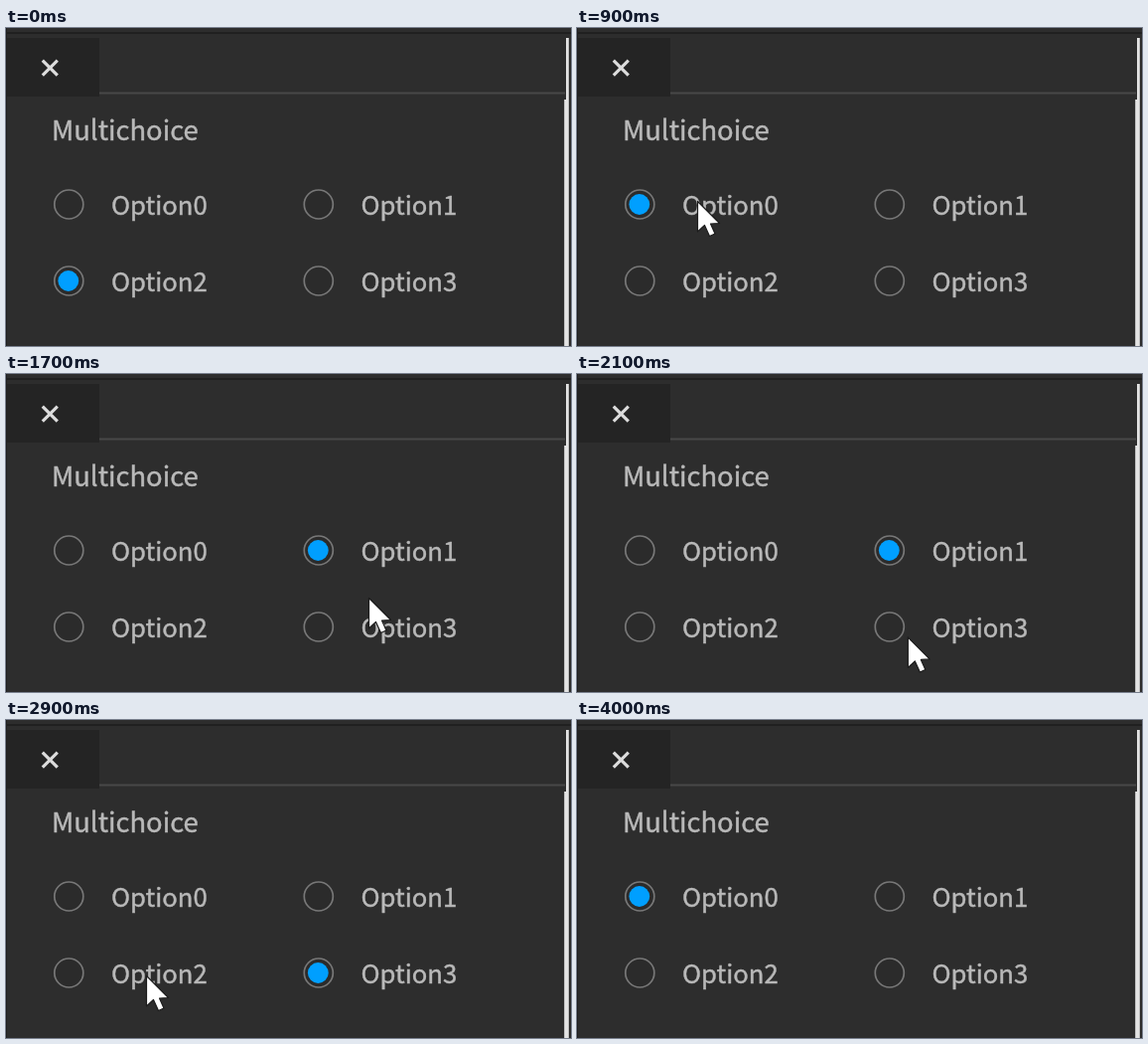
Animation, 569 px wide and 320 px high, one loop 4.6 s. Source, as an HTML page:

```html
<!DOCTYPE html>
<html lang="en">
<head>
<meta charset="utf-8">
<title>Multichoice</title>
<style>
  html, body { margin: 0; width: 100%; height: 100%; overflow: hidden; background: #2d2d2d; }
  svg { display: block; width: 569px; height: 320px; }
  text {
    font: 25.7px "Noto Sans CJK JP", "Noto Sans CJK SC", "Noto Sans CJK", "Noto Sans", sans-serif;
    fill: #b9b9b9; stroke: #b9b9b9; stroke-width: 0.45;
  }
  .title { font-size: 27.4px; }
  .soft { filter: blur(0.6px); }
  .ring { fill: #2b2b2b; stroke: #787878; stroke-width: 1.7; }
  .dot { fill: #009fff; }
</style>
</head>
<body>
<svg viewBox="0 0 569 320">
  <rect width="569" height="320" fill="#2d2d2d"/>
  <rect y="4" width="569" height="2" fill="#202020"/>
  <rect y="10" width="94" height="59" fill="#242424"/>
  <rect width="1" height="320" fill="#1f1f1f"/>
  <rect x="94" y="64.5" width="469" height="2" fill="#484848"/>
  <g class="soft">
    <path d="M564 10h2.8v320h-4.6V72h1.8z" fill="#e4e4e4"/>
    <path d="M36.8 32.7l15 15M51.8 32.7l-15 15" stroke="#dcdcdc" stroke-width="3.2"/>
    <text class="title" x="46" y="112.5">Multichoice</text>
    <g id="options"></g>
    <path id="cursor" d="M.5 2.5V33L7.5 26.5L12.5 37.5L18 35L13.5 25L22.5 24.5Z"
          fill="#fff" stroke="#1c1c1c" stroke-width="1.2" stroke-linejoin="round"/>
  </g>
</svg>
<script>
const LOOP = 4600, STEP = 100;

// [time, selected option]
const picks = [[0, 2], [800, 0], [1400, 1], [2200, 3], [3000, 2], [3400, 0]];

// Pointer key points, joined by a smooth curve
const keys = [
  [200, 307, 300], [700, 60, 195], [900, 121, 172], [1300, 304, 178],
  [1700, 365, 223], [1900, 381, 277], [2200, 318, 254], [2500, 373, 262],
  [2900, 141, 255], [3100, 64, 253], [3400, 66, 182], [3600, 143, 180], [3700, 185, 244]
].map(([t, x, y]) => ({ t, x, y }));
const last = keys.length - 1;

const NS = "http://www.w3.org/2000/svg";
const group = document.getElementById("options");
const cursor = document.getElementById("cursor");

function add(tag, attrs, label = "") {
  const el = document.createElementNS(NS, tag);
  for (const key in attrs) el.setAttribute(key, attrs[key]);
  el.textContent = label;
  return group.appendChild(el);
}

const dots = [0, 1, 2, 3].map(i => {
  const cx = 63.3 + 251.5 * (i % 2), cy = 177.5 + 77 * (i >> 1);
  add("circle", { class: "ring", cx, cy, r: 14.5 });
  add("text", { x: cx + 42.7, y: cy + 10.2 }, "Option" + i);
  return add("circle", { class: "dot", cx: cx - 0.5, cy, r: 10.4 });
});

function slope(i, axis) {
  const a = keys[Math.max(i - 1, 0)], b = keys[Math.min(i + 1, last)];
  return (b[axis] - a[axis]) / (b.t - a.t);
}

// Cubic Hermite interpolation between neighbouring key points
function pointer(time, axis) {
  const i = Math.max(keys.findIndex(k => k.t >= time), 1);
  const a = keys[i - 1], b = keys[i], span = b.t - a.t;
  const u = (time - a.t) / span, v = 1 - u;
  return v * v * (1 + 2 * u) * a[axis] + u * u * (1 + 2 * v) * b[axis]
    + span * u * v * (v * slope(i - 1, axis) - u * slope(i, axis));
}

function draw(time) {
  const t = Math.floor((time % LOOP) / STEP) * STEP;
  const chosen = picks.findLast(p => p[0] <= t)[1];
  dots.forEach((dot, i) => dot.setAttribute("visibility", i === chosen ? "visible" : "hidden"));
  const shown = t >= keys[0].t && t <= keys[last].t;
  cursor.setAttribute("visibility", shown ? "visible" : "hidden");
  if (shown) cursor.setAttribute("transform", `translate(${pointer(t, "x")} ${pointer(t, "y")})`);
}

let start;
function tick(now) {
  start ??= now;
  draw(now - start);
  requestAnimationFrame(tick);
}
draw(0);
requestAnimationFrame(tick);
</script>
</body>
</html>
```
